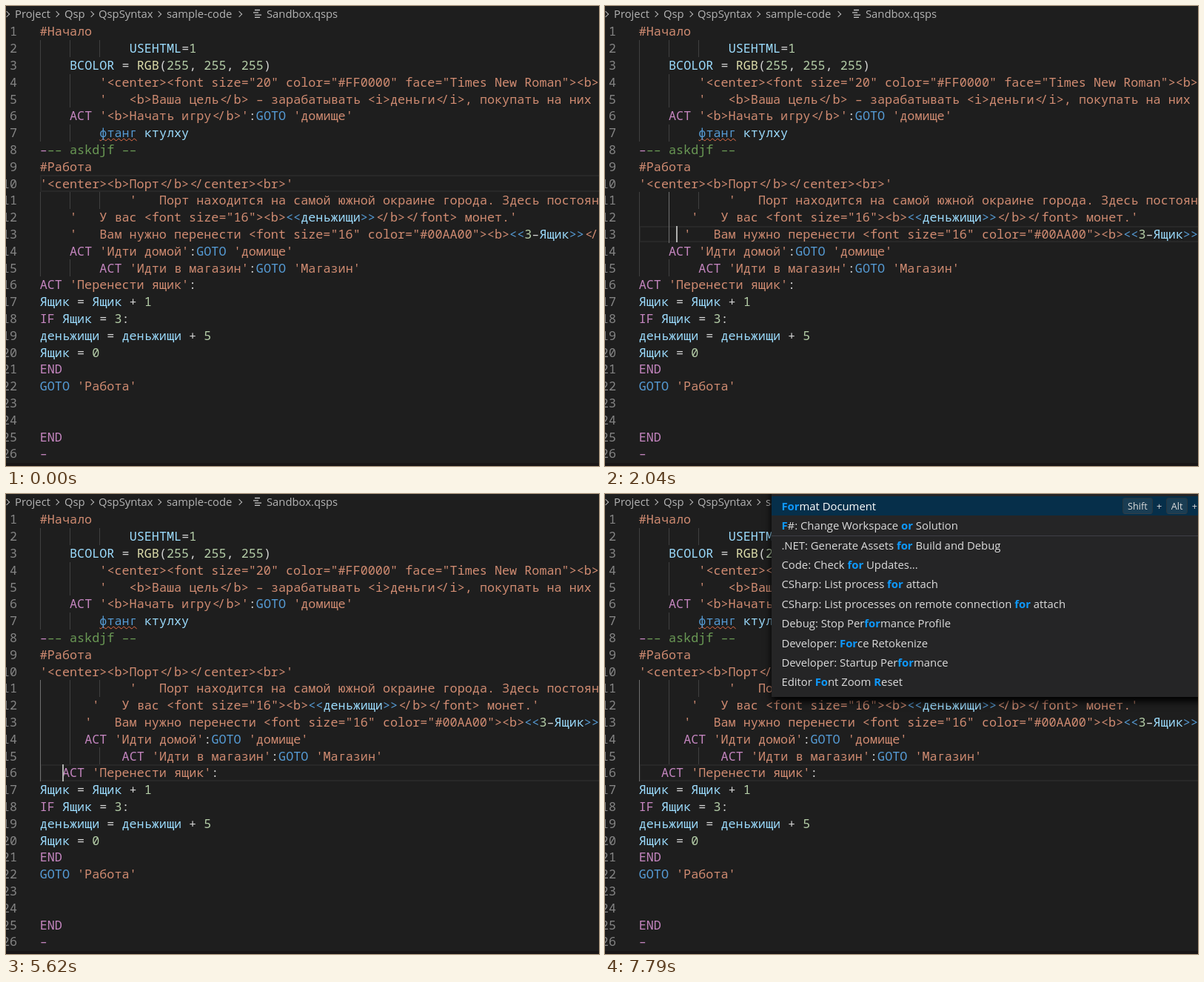
An HTML page for the animation above (8 s loop, 801 by 621 pixels).

```html
<!DOCTYPE html>
<html lang="ru">
<head>
<meta charset="utf-8">
<title>Code editor</title>
<style>
  html, body { margin: 0; width: 100%; height: 100%; overflow: hidden; background: #1e1e1e; }
  #stage { position: relative; width: 801px; height: 621px; overflow: hidden; background: #1e1e1e; }
  #stage div, .crumb, .chevron { position: absolute; white-space: pre; }
  i { font-style: normal; }

  .crumb { top: -1px; font: 14.8px/22px "Open Sans", sans-serif; color: #b4b4b4; }
  .chevron { top: 7.5px; width: 5px; height: 5px; border: solid #b4b4b4; border-width: 1.2px 1.2px 0 0; transform: rotate(45deg); }
  .file-icon { left: 334px; top: 4px; }
  .file-icon, #bottom { position: absolute; }

  .row { left: 0; width: 801px; height: 22.8px; font: 500 16.8px/22.8px "Noto Sans Mono", monospace; color: #d4d4d4; font-variant-ligatures: none; }
  .code { top: .4px; }
  .number { top: .4px; right: 786px; color: #858585; font-weight: 400; }
  .guide { top: 0; width: 1px; height: 22.9px; background: #404040; }
  .guide.active { background: #707070; }
  .current { left: 45.7px; right: 0; top: 0; height: 22.8px; box-sizing: border-box; border: 2px solid #282828; border-right: 0; }
  .cursor { top: 0; width: 2px; height: 22.8px; background: #aeafad; }

  .string { color: #d18c72; }
  .keyword { color: #c586c0; }
  .jump, .odd { color: #569cd6; }
  .variable { color: #9cdcfe; }
  .function { color: #dcdcaa; }
  .number-literal { color: #b5cea8; }
  .comment { color: #6a9955; }
  .odd { text-decoration: underline wavy #e8704a 1px; text-underline-offset: 1px; text-decoration-skip-ink: none; }
  .pull-right, .pull-left { position: relative; left: 1.5px; }
  .pull-left { left: -1.5px; }

  #bottom { left: 0; top: 617px; width: 801px; height: 4px; background: #191617; }
  #palette { left: 225px; top: -20px; width: 620px; height: 293.5px; background: #252526; box-shadow: 0 6px 9.6px #000; }
  .item { left: 0; width: 100%; height: 26.4px; box-sizing: border-box; padding-left: 13.4px; font: 14.85px/26.4px "Open Sans", sans-serif; color: #dcdcdc; }
  .item.selected { background: #062f4a; color: #fff; }
  .item.separated { box-shadow: inset 0 1px #3f3f46; }
  .item b { color: #0f98fa; }
  #stage .keys { top: 2.4px; display: flex; font-size: 12.7px; line-height: 20px; color: #ddd; }
  .keys kbd { font: inherit; padding: 0 6px; background: rgba(128, 128, 128, .17); border: 1px solid rgba(51, 51, 51, .6); border-bottom-color: rgba(68, 68, 68, .6); border-radius: 4px; }
  .keys span { width: 18px; text-align: center; line-height: 22px; }
</style>
</head>
<body>
<div id="stage">
  <div id="editor"></div>
  <div id="crumbs"></div>
  <svg class="file-icon" width="13" height="13" stroke="#c5c5c5" stroke-width="1.3"><path d="M2 1.5H9M0 4.8H7M2 8.1H11M2 11.3H9"/></svg>
  <div id="bottom"></div>
  <div id="palette"></div>
</div>
<script>
const LOOP = 8000, LEFT = 45.7, TOP = 23.1, LINE = 22.8, CHAR = 10.08;

const source = `#Начало
            USEHTML=1
    BCOLOR = RGB(255, 255, 255)
        '<center><font size="20" color="#FF0000" face="Times New Roman"><b>
        '   <b>Ваша цель</b> - зарабатывать <i>деньги</i>, покупать на них
    ACT '<b>Начать игру</b>':GOTO 'домище'
        фтанг ктулху
--- askdjf --
#Работа
'<center><b>Порт</b></center><br>'
            '   Порт находится на самой южной окраине города. Здесь постоянно
    '   У вас <font size="16"><b><<деньжищи>></b></font> монет.'
    '   Вам нужно перенести <font size="16" color="#00AA00"><b><<3-Ящик>></b></font>
    ACT 'Идти домой':GOTO 'домище'
        ACT 'Идти в магазин':GOTO 'Магазин'
ACT 'Перенести ящик':
Ящик = Ящик + 1
IF Ящик = 3:
деньжищи = деньжищи + 5
Ящик = 0
END
GOTO 'Работа'


END
-`.split("\n");

// [time, line, column, typed spaces]
const moves = [
  [0, 10, -1], [80, 11, 14], [310, 12, 0],
  [780, 12, 1, 1], [1020, 12, 2, 1], [1180, 12, 3, 1],
  [1650, 13, 3], [1845, 13, 4, 1], [2040, 13, 5, 1],
  [2350, 14, 5], [2545, 14, 4], [2740, 14, 3], [2935, 14, 4, 1], [3130, 14, 5, 1],
  [3520, 15, 3], [3680, 15, 4], [3990, 15, 5, 1], [4145, 15, 6, 1], [4300, 15, 7, 1],
  [4690, 16, 7], [4920, 16, 0], [5230, 16, 1, 1], [5425, 16, 2, 1], [5620, 16, 3, 1]
];

// Square brackets mark matched letters, "|" precedes the shortcut.
const typedF = [
  "[F]ormat Document|Shift Alt", "YASpellChecker: don't ignore this [f]ile",
  "Pre[f]erences: Open User Settings", "YASpellChecker: ignore this [f]ile",
  "[F]#: New Project", "[F]old Level 1|Ctrl", "[F]ile: Compare Active File With...",
  "Pre[f]erences: Open Settings (JSON)", "[F]old Level 2|Ctrl", "[F]#: Change Workspace or Solution"
];
const typedFor = [
  "[For]mat Document|Shift Alt", "[F]#: Change Workspace [or] Solution",
  ".NET: Generate Assets [for] Build and Debug", "Code: Check [for] Updates...",
  "CSharp: List process [for] attach", "CSharp: List processes on remote connection [for] attach",
  "Debug: Stop Per[for]mance Profile", "Developer: [For]ce Retokenize",
  "Developer: Startup Per[for]mance", "Editor [Fo]nt Zoom [R]eset"
];
const typedFo = [
  "[Fo]rmat Document|Shift Alt", "[Fo]ld Level 1|Ctrl", "[Fo]ld Level 2|Ctrl",
  "[F]#: Change W[o]rkspace or Solution",
  ...typedFor.slice(2, 8).map(s => s.replace(/\[(fo)r\]/i, "[$1]r"))
];
const menus = [
  { time: 6010, items: typedF.map(s => s.replace(/[\[\]]/g, "")) },
  { time: 7250, items: typedF },
  { time: 7560, items: typedFo, separator: 4 },
  { time: 7790, items: typedFor, separator: 2 }
];

const byId = id => document.getElementById(id);
const words = { ACT: "keyword", IF: "keyword", END: "keyword", GOTO: "jump", RGB: "function", "фтанг": "odd" };
const escapeHtml = s => s.replace(/&/g, "&amp;").replace(/</g, "&lt;").replace(/>/g, "&gt;");

// Tightens "</" and widens hyphens, like a coding font.
function glyphs(text) {
  return escapeHtml(text.replace(/-/g, "–"))
    .replace(/&lt;\//g, '<i class="pull-right">&lt;</i><i class="pull-left">/</i>');
}
const token = (kind, text) => `<span class="${kind}">${glyphs(text)}</span>`;

function quoted(text) {
  return text.split(/(<<.*?>>)/).map((part, i) => i % 2
    ? token("jump", "<<") + highlight(part.slice(2, -2)) + token("jump", ">>")
    : token("string", part)).join("");
}

function highlight(text) {
  const pattern = /'[^']*'?|^#.+|^-|--.*|[A-Za-zА-яё]+|\d+|[^]/g;
  return text.replace(pattern, (part, at) => {
    if (part[0] === "'") return quoted(part);
    if (part[0] === "#") return token("string", part);
    if (part === "-" && at === 0) return token("keyword", part);
    if (part.startsWith("--")) return token("comment", part);
    if (/\d/.test(part)) return token("number-literal", part);
    if (/[A-Za-zА-яё]/.test(part)) return token(words[part] || "variable", part);
    return glyphs(part);
  });
}

const lines = source.map(text => ({
  indent: text.search(/\S|$/),
  html: highlight(text.trim())
}));

const columnX = column => LEFT + column * CHAR;
const bar = (kind, column) => `<div class="${kind}" style="left:${columnX(column)}px"></div>`;

// The guide of the block that the cursor is in or next to.
function activeGuide(levels, line) {
  let from = line, depth = levels[line];
  if (levels[line + 1] === depth + 1) from = line + 1;
  else if (levels[line - 1] === depth + 1) from = line - 1;
  depth = levels[from];
  let first = from, last = from;
  while (levels[first - 1] >= depth) first--;
  while (levels[last + 1] >= depth) last++;
  return { first, last, depth };
}

function drawEditor(count, focused) {
  const indents = lines.map(l => l.indent);
  for (const [, line, , typed = 0] of moves.slice(0, count)) indents[line - 1] += typed;
  const [, line, column] = moves[count - 1];
  const levels = indents.map(n => Math.ceil(n / 4));
  const active = activeGuide(levels, line - 1);

  byId("editor").innerHTML = lines.map(({ html }, i) => {
    const isCurrent = i === line - 1;
    let row = isCurrent ? '<div class="current"></div>' : "";
    for (let level = 1; level <= levels[i]; level++) {
      const lit = level === active.depth && i >= active.first && i <= active.last;
      row += bar(lit ? "guide active" : "guide", (level - 1) * 4);
    }
    row += `<div class="number">${i + 1}</div><div class="code" style="left:${columnX(indents[i])}px">${html}</div>`;
    if (isCurrent && focused && column >= 0) row += bar("cursor", column);
    return `<div class="row" style="top:${TOP + i * LINE}px">${row}</div>`;
  }).join("");
}

function drawPalette(menu) {
  byId("palette").style.display = menu ? "block" : "none";
  if (!menu) return;
  byId("palette").innerHTML = menu.items.map((item, i) => {
    const [label, shortcut] = item.split("|");
    const kind = i === 0 ? " selected" : i === menu.separator ? " separated" : "";
    let keys = "";
    if (shortcut) {
      const caps = shortcut.split(" ").map(k => `<kbd>${k}</kbd><span>+</span>`).join("");
      keys = `<div class="keys" style="left:${shortcut === "Ctrl" ? 542 : 474}px">${caps}</div>`;
    }
    const text = label.replace(/\[/g, "<b>").replace(/\]/g, "</b>");
    return `<div class="item${kind}" style="top:${22.7 + i * 26.4}px">${text}${keys}</div>`;
  }).join("");
}

byId("crumbs").innerHTML =
  [[12, "Project"], [79, "Qsp"], [125, "QspSyntax"], [217, "sample-code"], [352, "Sandbox.qsps"]]
    .map(([x, name]) => `<span class="crumb" style="left:${x}px">${name}</span>`).join("") +
  [-2, 65, 112, 203, 312].map(x => `<span class="chevron" style="left:${x}px"></span>`).join("");

let shown = "";
function tick() {
  const time = performance.now() % LOOP;
  const moveCount = moves.filter(m => m[0] <= time).length;
  const menuCount = menus.filter(m => m.time <= time).length;
  const state = moveCount + ":" + menuCount;
  if (state !== shown) {
    shown = state;
    drawEditor(moveCount, menuCount === 0);
    drawPalette(menus[menuCount - 1]);
  }
  requestAnimationFrame(tick);
}
tick();
</script>
</body>
</html>
```
